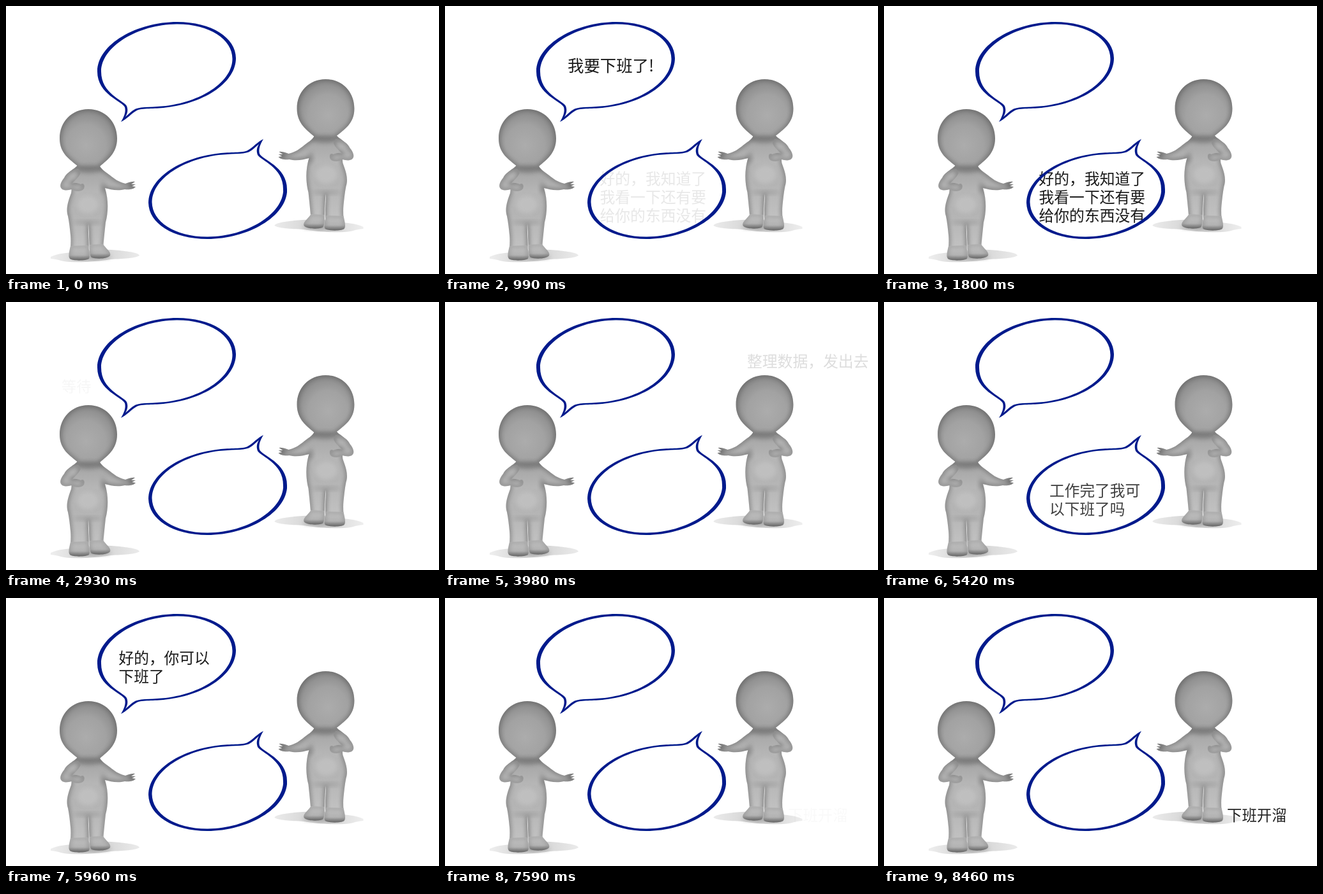
An HTML page for the animation above (8490 ms loop, 678x421 px).

```html
<!DOCTYPE html>
<html lang="zh-CN">
<head>
<meta charset="utf-8">
<title>Two figures talking</title>
<style>
  html, body { margin: 0; width: 100%; height: 100%; overflow: hidden; background: #fff; }
  svg { display: block; width: 100%; height: 100%; }
  text { font-family: "Noto Sans CJK SC", "Noto Sans CJK", sans-serif; fill: #1a1a1a; }
  .caption { opacity: 0; }
</style>
</head>
<body>
<svg id="stage" viewBox="0 0 678 421" xmlns="http://www.w3.org/2000/svg">
  <defs>
    <radialGradient id="headFill" cx=".46" cy=".6" r=".62">
      <stop offset="0" stop-color="#acacac"/>
      <stop offset=".55" stop-color="#a2a2a2"/>
      <stop offset="1" stop-color="#868686"/>
    </radialGradient>
    <linearGradient id="bodyFill" gradientUnits="userSpaceOnUse" x1="0" y1="250" x2="0" y2="390">
      <stop offset="0" stop-color="#a2a2a2"/>
      <stop offset=".3" stop-color="#b6b6b6"/>
      <stop offset=".55" stop-color="#b4b4b4"/>
      <stop offset="1" stop-color="#c4c4c4"/>
    </linearGradient>
    <linearGradient id="footFill" x1="0" y1="0" x2="0" y2="1">
      <stop offset="0" stop-color="#c2c2c2"/>
      <stop offset=".65" stop-color="#b2b2b2"/>
      <stop offset="1" stop-color="#6c6c6c"/>
    </linearGradient>
    <linearGradient id="floorFill">
      <stop offset="0" stop-color="#eeeeee"/>
      <stop offset=".5" stop-color="#cfcfcf"/>
      <stop offset="1" stop-color="#ebebeb"/>
    </linearGradient>
    <filter id="soft" x="-50%" y="-50%" width="200%" height="200%"><feGaussianBlur stdDeviation="3"/></filter>
    <path id="bubble" fill="#001a8c" fill-rule="evenodd" d="
      M180 182C185 174 188 166 186 159C183 150 143 139 143 103C143 60 205 25 268 25
      C322 25 360 50 360 82C360 118 315 152 250 159.5C232 162 213 160 205 164C196 169 189 178 180 182Z
      M187 174C191 168 191 162 189 157C184 148 149 138 149 103C149 64 206 29 267 28.5
      C318 28 354.5 52 354.5 83C354.5 116 312 149 250 157C232 159 212 158 203 161.5C196 165 191 171 187 174Z"/>
    <g id="figure"></g>
  </defs>
  <use href="#figure"/>
  <use href="#figure" transform="translate(629.5 -47) scale(-1 1)"/>
  <g id="captions"></g>
  <use href="#bubble"/>
  <use href="#bubble" transform="rotate(180 291.5 195.5)"/>
</svg>
<script>
const NS = 'http://www.w3.org/2000/svg';
const LOOP = 8490;

function add(parent, tag, attrs, content) {
  const el = document.createElementNS(NS, tag);
  for (const key in attrs) el.setAttribute(key, attrs[key]);
  if (content) el.textContent = content;
  return parent.appendChild(el);
}

const figure = document.getElementById('figure');
const defs = document.querySelector('defs');

// A filled shape with a soft dark rim and soft inner shades [cx, cy, rx, ry, color, opacity].
function solid(id, d, fill, rim, shades = []) {
  add(add(defs, 'clipPath', { id }), 'path', { d });
  add(figure, 'path', { d, fill });
  const inner = add(figure, 'g', { 'clip-path': `url(#${id})` });
  add(inner, 'path', {
    d, fill: 'none', stroke: '#4c4c4c', 'stroke-width': rim, opacity: .62, filter: 'url(#soft)'
  });
  for (const [cx, cy, rx, ry, color, opacity] of shades)
    add(inner, 'ellipse', { cx, cy, rx, ry, fill: color, opacity, filter: 'url(#soft)' });
}

add(figure, 'path', {
  d: 'M70 394C82 388 98 388 112 386C135 382 158 382 178 384C195 386 208 388 209 392C204 396 184 397 164 398C145 401 120 403 100 402C88 402 84 398 70 397Z',
  fill: 'url(#floorFill)'
});
add(figure, 'ellipse', { cx: 133, cy: 394, rx: 32, ry: 4, fill: '#777', opacity: .5, filter: 'url(#soft)' });

solid('body', `M113 249C108 256 98 259 95 266C100 275 104 285 102 294C98 305 93 318 97 330
  C99 340 100 350 101 360C102 370 101 380 100 388L129 388C131 370 128 355 129 342
  C130 355 130 365 131 385L152 382C153 368 155 350 156 340C160 325 161 305 155 286
  C163 288 174 291 186 288C192 289 200 288 203 284L197 283L203 280L196 280L202 276
  C196 275 191 278 187 279C177 277 169 271 163 266C157 261 150 258 146 250Z`,
  'url(#bodyFill)', 4, [
    [130, 256, 22, 6, '#666', .6],
    [128, 312, 17, 14, '#c6c6c6', .6],
    [128, 340, 22, 3, '#888', .45],
    [152, 286, 4, 10, '#777', .4]
  ]);

solid('footLeft', 'M101 377C99 386 97 393 100 397C106 401 126 400 130 397C132 390 130 382 128 376Z',
  'url(#footFill)', 2);
solid('footRight', 'M131 375C130 384 131 392 134 395C142 398 160 397 163 392C165 386 157 382 152 374Z',
  'url(#footFill)', 2);

solid('arm', `M113 256C101 258 94 263 91 270C86 276 83 283 87 287C91 291 98 289 103 288
  C108 292 119 292 122 287C124 282 122 277 117 280C111 277 107 278 103 279C106 275 114 270 117 262Z`,
  'url(#bodyFill)', 3, [[105, 268, 7, 6, '#bcbcbc', .5]]);

solid('head', `M129 162C155 162 174 182 174 208C174 232 158 242 147 252C142 258 118 258 113 252
  C100 241 84 232 84 208C84 182 103 162 129 162Z`,
  'url(#headFill)', 4, [[130, 255, 15, 5, '#777', .6]]);

// x, first baseline, font size, lines, fade start, fade end, cut
const captions = [
  [192, 102.7, 25.4, ['我要下班了!'], 30, 930, 1020],
  [242.5, 280, 23.8, ['好的，我知道了', '我看一下还有要', '给你的东西没有'], 900, 1800, 2930],
  [87, 140.8, 23.2, ['等待'], 2900, 3800, 3860],
  [473, 102, 23.8, ['整理数据，发出去'], 3860, 4690, 4700],
  [259, 304.5, 23.7, ['工作完了我可', '以下班了吗'], 4690, 5560, 5570],
  [176.5, 102.8, 23.7, ['好的，你可以', '下班了'], 5490, 5960, 7590],
  [537, 349.5, 23.4, ['下班开溜'], 7570, 8490, LOOP]
];

const layer = document.getElementById('captions');
for (const [x, y, size, lines, start, end, cut] of captions) {
  const group = add(layer, 'g', { class: 'caption' });
  lines.forEach((line, i) => add(group, 'text', { x, y: y + i * 29, 'font-size': size }, line));
  const key = (time, opacity) => ({ offset: time / LOOP, opacity });
  group.animate(
    [key(0, 0), key(start, 0), key(end, 1), key(cut, 1), key(cut, 0), key(LOOP, 0)],
    { duration: LOOP, iterations: Infinity }
  );
}
</script>
</body>
</html>
```
